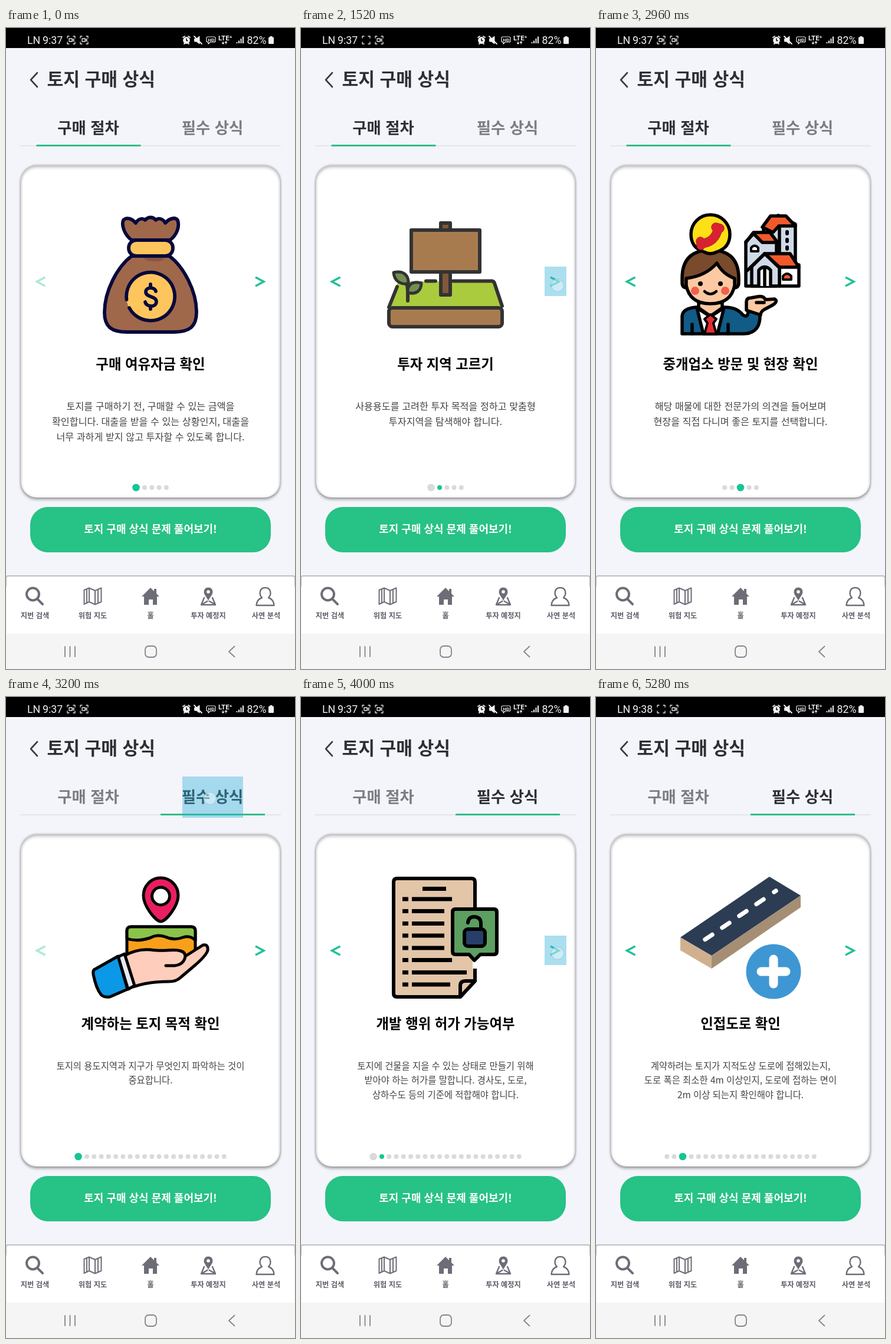
An HTML page that plays this animation: 490 px wide and 1088 px high, repeating every 5.36 s.

```html
<!DOCTYPE html>
<html lang="ko">
<head>
<meta charset="utf-8">
<style>
html, body { margin: 0; width: 100%; height: 100%; overflow: hidden; background: #f4f5fb; }
.card { position: absolute; left: 25px; top: 233px; width: 440px; height: 564px; border-radius: 27px; background: #fff;
  box-shadow: 0 4px 4px rgba(0,0,0,.27), 0 0 3px 1px rgba(0,0,0,.2), inset 0 4px 5px rgba(0,0,0,.2), inset 0 0 4px rgba(0,0,0,.16); }
svg { position: absolute; left: 0; top: 0; }
text { font-family: "Noto Sans CJK KR", "Noto Sans CJK", "Noto Sans KR", sans-serif; }
.bold { font-weight: 700; }
.mid { text-anchor: middle; }
.status text { font-family: Roboto, sans-serif; fill: #f2f2f2; }
.line { fill: none; stroke-linecap: round; stroke-linejoin: round; }
.art { stroke-linecap: round; stroke-linejoin: round; }
</style>
</head>
<body>
<div class="card"></div>
<svg width="490" height="1088" viewBox="0 0 490 1088">
  <rect width="490" height="34"/>
  <g class="status">
    <text x="36" y="26.5" font-size="17.8">LN</text>
    <text id="clock" x="62" y="26.5" font-size="17.8">9:37</text>
    <g class="line" stroke="#e8e8e8" stroke-width="1.3">
      <path id="frameIcon" d="M104 17V14H107M114 14H117V17M117 24V27H114M107 27H104V24"/>
      <use href="#frameIcon" x="22"/>
      <path id="cam" d="M107 18H112V23H107ZM112 20L115 18.5V22.5L112 21"/>
      <path d="M129 18H134V23H129ZM134 20L137 18.5V22.5L134 21"/>
    </g>
    <g class="line" stroke="#f2f2f2" stroke-width="1.8">
      <circle cx="306" cy="21" r="5" fill="#f2f2f2"/>
      <path d="M300 16L303 14M312 16L309 14M302 27L303 26M310 27L309 26"/>
      <path d="M306 18V21.5H308" stroke="#000" stroke-width="1.4"/>
      <path d="M320 18H323L328 14V27L323 23H320Z" fill="#f2f2f2" stroke-width="1"/>
      <path d="M319 14L332 27"/>
      <path d="M342 15H353Q355 15 355 17V22Q355 24 353 24H346L343 27V24Q340 24 340 22V17Q340 15 342 15Z" stroke-width="1.2"/>
      <path d="M368 23V27M366.5 25.5L368 27L369.5 25.5M373 27V23M371.5 24.5L373 23L374.5 24.5" stroke-width="1.2"/>
      <path d="M391.5 26V24M395 26V21.5M398.5 26V18M402 26V14.5" stroke-width="2" stroke-linecap="butt"/>
    </g>
    <text class="bold" x="342.5" y="22.5" font-size="8">HD</text>
    <text class="bold" x="360" y="21" font-size="11.5">LTE⁺</text>
    <text x="408.5" y="26.5" font-size="17.8">82%</text>
    <path d="M447.5 14H451.5V15.5H453Q454 15.5 454 17V26Q454 27 453 27H446Q445 27 445 26V17Q445 15.5 446 15.5H447.5Z" fill="#f2f2f2"/>
  </g>

  <path class="line" d="M53 76L42 88L53 100" stroke="#3a3a3f" stroke-width="2.6"/>
  <text class="bold" x="69.5" y="98" font-size="30.2" fill="#2e2e33">토지 구매 상식</text>
  <text id="tab0" class="bold mid" x="139.5" y="178.5" font-size="26.4">구매 절차</text>
  <text id="tab1" class="bold mid" x="350" y="178.5" font-size="26.4">필수 상식</text>
  <path d="M24 200H466" stroke="#e4e6eb" stroke-width="2"/>
  <rect id="underline" y="198" width="177" height="3" fill="#2fbf88"/>

  <g id="slides">
    <g class="art" stroke="#08083c" stroke-width="5.8" fill="#a0684a">
      <path d="M213 387C189 405 167 446 167 483C167 508 180 516 205 516H285C311 516 323 507 323 482C323 446 301 405 277 387Z"/>
      <path d="M232 389H270Q267 397 251 396Q236 396 232 389Z" fill="#8b5440" stroke="none"/>
      <path d="M213 360C202 352 195 336 199 326C205 320 214 324 220 331C225 322 233 323 236 326C241 320 249 320 254 326C258 322 266 323 270 331C276 324 286 320 291 326C295 338 289 352 278 360Z"/>
      <rect x="208" y="360" width="75" height="27" rx="13" fill="#ffc55d"/>
      <circle cx="245" cy="456" r="41" fill="#ffc55d" stroke="none"/>
      <path class="line" d="M204.5 461A41 41 0 1 1 209 475"/>
      <path class="line" d="M254 447C252 439 237 439 237 448C237 458 255 454 255 465C254 475 238 474 236 465M245 435V441M245 472V477"/>
    </g>

    <g class="art" stroke="#333" stroke-width="6" fill="#a87b4f">
      <path d="M164 432L149 474H341L327 430H164Z" fill="#abcb3e" stroke="none"/>
      <path class="line" d="M163 439L149 474M212 429.5H228M258 429.5H324Q327 430 328 433L341 472"/>
      <rect x="149" y="475" width="192" height="32" rx="6"/>
      <rect x="237" y="331" width="16" height="122" fill="#80583a"/>
      <rect x="187" y="343" width="116" height="71"/>
      <path class="line" d="M181 463V446Q181 430 169 420M182 447Q186 441 194 437"/>
      <path d="M157 415C174 411 183 420 182 434C167 436 158 428 157 415ZM181 449C180 436 188 429 204 433C204 446 195 453 181 449Z" fill="#719052" stroke-width="5"/>
    </g>

    <g class="art" stroke="#000" stroke-width="5.5" fill="#fff">
      <path d="M284 400V337L309 318L338 333V400Z" fill="#cfd9e8"/>
      <path d="M282 338L296 319H322L338 336H310L300 347Z" fill="#f1592b"/>
      <path class="line" d="M311 338V384"/>
      <path class="line" d="M324 346V349M324 359V362M324 372V375" stroke-width="6"/>
      <path d="M254 438V363L268 348L306 364V438Z" fill="#cfd9e8"/>
      <path d="M254 364L267 347H295L308 364H282L268 350" fill="#f1592b"/>
      <path d="M263 379V373Q269 366 275 373V379Z" fill="#fff" stroke-width="4"/>
      <path d="M311 402H344V438H311Z"/>
      <path d="M264 438V405L286 383L311 405V438Z" fill="#cfd9e8"/>
      <path d="M286 383H329L344 406H311Z" fill="#f1592b"/>
      <path class="line" d="M256 412L286 383L311 407"/>
      <path d="M276 438V411Q286 400 296 411V438M286 406V438"/>
      <path d="M317 427V421Q324 413 331 421V427Z" fill="#f1592b" stroke-width="4"/>

      <path d="M146 519V489Q147 476 169 474H219Q239 474 249 487Q258 493 258 480L278 484Q280 518 251 519Z" fill="#115b87"/>
      <path d="M174 466V475L194 489L214 475V466Z" fill="#fdc9a2"/>
      <path d="M171 475L182 519H206L217 475L194 490Z"/>
      <path d="M194 486L184 494L189 501L184 519H204L199 501L204 494Z" fill="#e62c35" stroke-width="4"/>
      <path class="line" d="M163 503V519M224 503V519"/>
      <path d="M255 479V465Q255 458 263 458L274 456Q284 454 287 461L303 460Q309 464 300 470L285 478Q279 482 279 487Z" fill="#fdc9a2"/>
      <path class="line" d="M272 466H285"/>
      <path d="M146 432V425Q146 377 194 377Q242 377 242 425V432Q242 441 234 441H154Q146 441 146 432Z" fill="#7a4a2d"/>
      <path d="M153 425Q186 421 205 399Q215 418 235 425V437Q229 468 194 468Q159 468 153 437Z" fill="#fdc9a2"/>
      <g fill="#000" stroke="none"><circle cx="177" cy="434" r="4"/><circle cx="211" cy="434" r="4"/></g>
      <path class="line" d="M184 447Q194 456 204 447" stroke-width="4.5"/>
      <g fill="#f2604c" stroke="none"><circle cx="168" cy="446" r="7"/><circle cx="219" cy="446" r="7"/></g>
      <path d="M183 380Q161 373 161 350A33 33 0 0 1 227 350Q227 373 205 380Q194 386 183 380Z" fill="#ffdf16"/>
      <g id="handset" class="line" stroke-width="15"><path d="M178 366Q203 364 207 339M177 362L178 369M203 338L210 340"/></g>
      <use href="#handset" class="line" style="stroke:#d92231"/>
      <path class="line" d="M178 366Q203 364 207 339M177 362L178 369M203 338L210 340" stroke="#d92231" stroke-width="8"/>
    </g>

    <g class="art" stroke="#000" stroke-width="5" fill="#ffcdbb">
      <path d="M262.500 381C254 381 233 355 233 337A29.500 30 0 0 1 292 337C292 355 271 381 262.500 381Z" fill="#e91e60"/>
      <circle cx="262.5" cy="338" r="15" fill="#fff"/>
      <path d="M205 440V397Q205 390 212 390H314Q321 390 321 397V440Z" fill="#f9a01b"/>
      <path d="M205 410V397Q205 390 212 390H314Q321 390 321 397V413Q312 404 300 408Q285 414 270 407Q256 402 244 409Q221 416 205 410Z" fill="#8bc34a"/>
      <path d="M201 439Q222 427 245 429Q260 431 273 430Q304 427 304 440L334 421Q343 419 342 430Q340 438 322 454L296 476Q289 483 276 483Q241 483 216 492Z"/>
      <path class="line" d="M304 440Q302 454 286 456H271"/>
      <path d="M190 441L201 436L218 490L207 496Z" fill="#e8eaf2"/>
      <path d="M151 462Q147 463 148 471Q153 495 161 505Q165 510 176 509L206 496L190 440Z" fill="#0b98e6"/>
    </g>

    <g class="art" stroke="#000" stroke-width="6" fill="#e3c5a8">
      <path d="M157 314Q157 308 163 308H289Q295 308 295 314V482L270 509H163Q157 509 157 503Z"/>
      <path d="M270 509V490Q270 482 279 482H295Z"/>
      <g stroke-width="7" stroke-linecap="butt" fill="none">
        <path d="M206 325.5H246"/>
        <path d="M172 343H182M188 343H256M172 363.5H182M188 363.5H243M172 384.5H182M188 384.5H243M172 405H182M188 405H243M172 426H182M188 426H243M172 446.5H182M188 446.5H256M172 467.5H182M188 467.5H281M172 488H182M188 488H253"/>
      </g>
      <path d="M295 441V461" stroke="#fff" stroke-width="8" stroke-linecap="butt"/>
      <path d="M262 360H327Q332 360 332 365V432Q332 437 327 437H304L294 447L285 437H262Q257 437 257 432V365Q257 360 262 360Z" fill="#5c9f60"/>
      <path class="line" d="M283 383Q284 373 294 373Q305 374 305 384V394"/>
      <rect x="277" y="394" width="35" height="29" rx="6" fill="#273f68"/>
    </g>

    <g>
      <path d="M143 408L294 305L347 337L196 439Z" fill="#2c3c53"/>
      <path d="M143 408L196 439V461L143 430Z" fill="#d1b08f"/>
      <path d="M196 439L347 337V357L196 461Z" fill="#a58e74"/>
      <path class="line" d="M185 411.5L197 403.5M214 391.5L226 383.5M243 371.5L255 363.5M272 351.5L284 343.5M302 331L305 329" stroke="#fff" stroke-width="7.5"/>
      <circle cx="301" cy="466" r="46.5" fill="#3e97d3"/>
      <path class="line" d="M301 445V487M280 466H322" stroke="#fff" stroke-width="15"/>
    </g>
  </g>

  <g fill="none" stroke-width="3.6">
    <path id="prev" d="M66.500 423L52.500 430.500L66.500 438"/>
    <path d="M423 423L437 430.500L423 438" stroke="#1fc198"/>
  </g>
  <g id="dots"></g>

  <rect x="41" y="813" width="408" height="77" rx="30" fill="#27c285"/>
  <text class="bold mid" x="245" y="857" font-size="18" fill="#fff">토지 구매 상식 문제 풀어보기!</text>

  <rect y="929" width="490" height="20" rx="3" fill="#bfbfc3"/>
  <rect x="1" y="931" width="488" height="98" rx="3" fill="#fff"/>
  <g class="line" stroke="#6d6d78" stroke-width="2.4">
    <g stroke-width="4"><circle cx="45.5" cy="961" r="10.5"/><path d="M53.5 969.5L62 978"/></g>
    <path d="M132.5 954L141 950.5L151 955L161.5 950.5V974L151 978.5L141 974L132.5 978ZM141 950.5V974M151 955V978.5M156 953V976M137 952.5V975.5" stroke-width="2"/>
    <path d="M245 950L230 965H234V979H242V970H249V979H256V965H260L255 960V952H251V956Z" fill="#6d6d78" stroke="none"/>
    <path d="M336 967L331 979H355L350 967M331 979L343 972L354 978"/>
    <path d="M343 973C340 966 335 962 335 957A8 8 0 0 1 351 957C351 962 346 966 343 973Z" fill="#6d6d78" stroke="#fff" stroke-width="1"/>
    <circle cx="343" cy="957" r="2.8" fill="#fff" stroke="none"/>
    <path d="M434 967C428 961 430 950 439.5 950C449 950 451 961 445 967C451 969 454 973 454.5 980H424.5C425 973 428 969 434 967Z"/>
  </g>
  <g id="nav" class="bold mid" font-size="12.2" fill="#5d5d68"></g>

  <rect y="1028" width="490" height="60" fill="#f5f5f5"/>
  <g class="line" stroke="#85858a" stroke-width="1.8">
    <path d="M100 1050V1067M108.5 1050V1067M117 1050V1067"/>
    <rect x="236" y="1049" width="19" height="19" rx="6"/>
    <path d="M387.5 1049.5L378 1058.5L387.5 1067.5"/>
  </g>

  <rect id="flash" fill="#2fb0d8"/>
  <circle id="touch" r="10.5" fill="#fff" fill-opacity=".42" stroke="#9fd0e4" stroke-opacity=".85" stroke-width="1.4"/>
</svg>
<script>
const LOOP = 5360, DOT = 8, BIG_DOT = 12.6, GAP = 4.25, GROW_MS = 240;
const $ = id => document.getElementById(id);
const set = (el, attrs) => { for (const k in attrs) el.setAttribute(k, attrs[k]); };
const make = (tag, attrs, parent, label = '') => {
  const el = document.createElementNS('http://www.w3.org/2000/svg', tag);
  set(el, attrs);
  el.textContent = label;
  return parent.appendChild(el);
};

// at: when the slide appears; page: position inside its tab
const slides = [
  { at: 0, tab: 0, page: 0, title: '구매 여유자금 확인',
    lines: ['토지를 구매하기 전, 구매할 수 있는 금액을', '확인합니다. 대출을 받을 수 있는 상황인지, 대출을', '너무 과하게 받지 않고 투자할 수 있도록 합니다.'] },
  { at: 1520, tab: 0, page: 1, title: '투자 지역 고르기',
    lines: ['사용용도를 고려한 투자 목적을 정하고 맞춤형', '투자지역을 탐색해야 합니다.'] },
  { at: 2240, tab: 0, page: 2, title: '중개업소 방문 및 현장 확인',
    lines: ['해당 매물에 대한 전문가의 의견을 들어보며', '현장을 직접 다니며 좋은 토지를 선택합니다.'] },
  { at: 3200, tab: 1, page: 0, title: '계약하는 토지 목적 확인',
    lines: ['토지의 용도지역과 지구가 무엇인지 파악하는 것이', '중요합니다.'] },
  { at: 4000, tab: 1, page: 1, title: '개발 행위 허가 가능여부',
    lines: ['토지에 건물을 지을 수 있는 상태로 만들기 위해', '받아야 하는 허가를 말합니다. 경사도, 도로,', '상하수도 등의 기준에 적합해야 합니다.'] },
  { at: 4880, tab: 1, page: 2, title: '인접도로 확인',
    lines: ['계약하려는 토지가 지적도상 도로에 접해있는지,', '도로 폭은 최소한 4m 이상인지, 도로에 접하는 면이', '2m 이상 되는지 확인해야 합니다.'] }
];
const tabs = [
  { count: 5, underline: 51.5, titleY: 578.5, textY: 648, step: 26, size: 16.2 },
  { count: 21, underline: 262, titleY: 563, textY: 631.5, step: 24.5, size: 15.4 }
];
const arrowBox = { x: 413, y: 405, width: 37, height: 50 };
const tabBox = { x: 299, y: 135, width: 103, height: 70 };
const taps = [
  { down: 1280, lit: 1440, up: 1600, x: 435, y: 437, box: arrowBox },
  { down: 2160, lit: 2160, up: 2320, x: 432, y: 434, box: arrowBox },
  { down: 3120, lit: 3200, up: 3280, x: 346, y: 172, box: tabBox },
  { down: 3840, lit: 3920, up: 4080, x: 435, y: 435, box: arrowBox },
  { down: 4720, lit: 4800, up: 4960, x: 438.5, y: 436, box: arrowBox }
];
const blinks = [560, 1040, 1520, 2000, 2480, 2720, 3440, 3680, 4400, 4880, 5280];

const groups = [...$('slides').children];
slides.forEach((s, i) => {
  const tab = tabs[s.tab];
  make('text', { class: 'bold mid', x: 245, y: tab.titleY, 'font-size': 23.4, fill: '#000', stroke: 'none' }, groups[i], s.title);
  s.lines.forEach((line, n) => make('text',
    { class: 'mid', x: 245, y: tab.textY + n * tab.step, 'font-size': tab.size, fill: '#444', stroke: 'none' }, groups[i], line));
});
['지번 검색', '위험 지도', '홀', '투자 예정지', '사연 분석'].forEach((label, i) =>
  make('text', { x: 49 + i * 98, y: 1002 }, $('nav'), label));
const dots = Array.from({ length: 21 }, () => make('circle', { cy: 780 }, $('dots')));

function drawDots(slide, previous, t) {
  const { count } = tabs[slide.tab];
  const grow = Math.min(1, (t - slide.at) / GROW_MS);
  const ease = grow * grow * (3 - 2 * grow);
  const moved = previous && previous.tab === slide.tab;
  const widthOf = i => {
    if (i === slide.page) return moved ? DOT + (BIG_DOT - DOT) * ease : BIG_DOT;
    return moved && i === previous.page ? BIG_DOT - (BIG_DOT - DOT) * ease : DOT;
  };
  let x = 245 - ((count - 1) * (DOT + GAP) + BIG_DOT) / 2;
  dots.forEach((dot, i) => {
    const w = widthOf(i);
    set(dot, { cx: x + w / 2, r: i < count ? w / 2 : 0, fill: i === slide.page ? '#14c693' : '#dadada' });
    x += w + GAP;
  });
}

function render(t) {
  const index = slides.filter(s => s.at <= t).length - 1;
  const slide = slides[index];
  groups.forEach((g, i) => g.style.display = i === index ? '' : 'none');
  tabs.forEach((_, i) => set($('tab' + i), { fill: i === slide.tab ? '#2e2e33' : '#7c7c84' }));
  set($('underline'), { x: tabs[slide.tab].underline });
  set($('prev'), { stroke: slide.page ? '#1fc198' : '#ace8d8' });
  drawDots(slide, slides[index - 1], t);

  const tap = taps.find(p => t >= p.down && t < p.up + 160);
  set($('touch'), { cx: tap ? tap.x : 0, cy: tap ? tap.y : 0, opacity: tap && t < tap.up ? 1 : 0 });
  const fade = tap && t >= tap.lit ? Math.min(1, 1 - (t - tap.up) / 160) : 0;
  set($('flash'), { ...(tap ? tap.box : arrowBox), opacity: 0.4 * fade });

  $('cam').style.visibility = blinks.filter(b => b <= t).length % 2 ? 'hidden' : 'visible';
  $('clock').textContent = t < 5120 ? '9:37' : '9:38';
}

const start = performance.now();
function frame() {
  render((performance.now() - start) % LOOP);
  requestAnimationFrame(frame);
}
frame();
</script>
</body>
</html>
```
